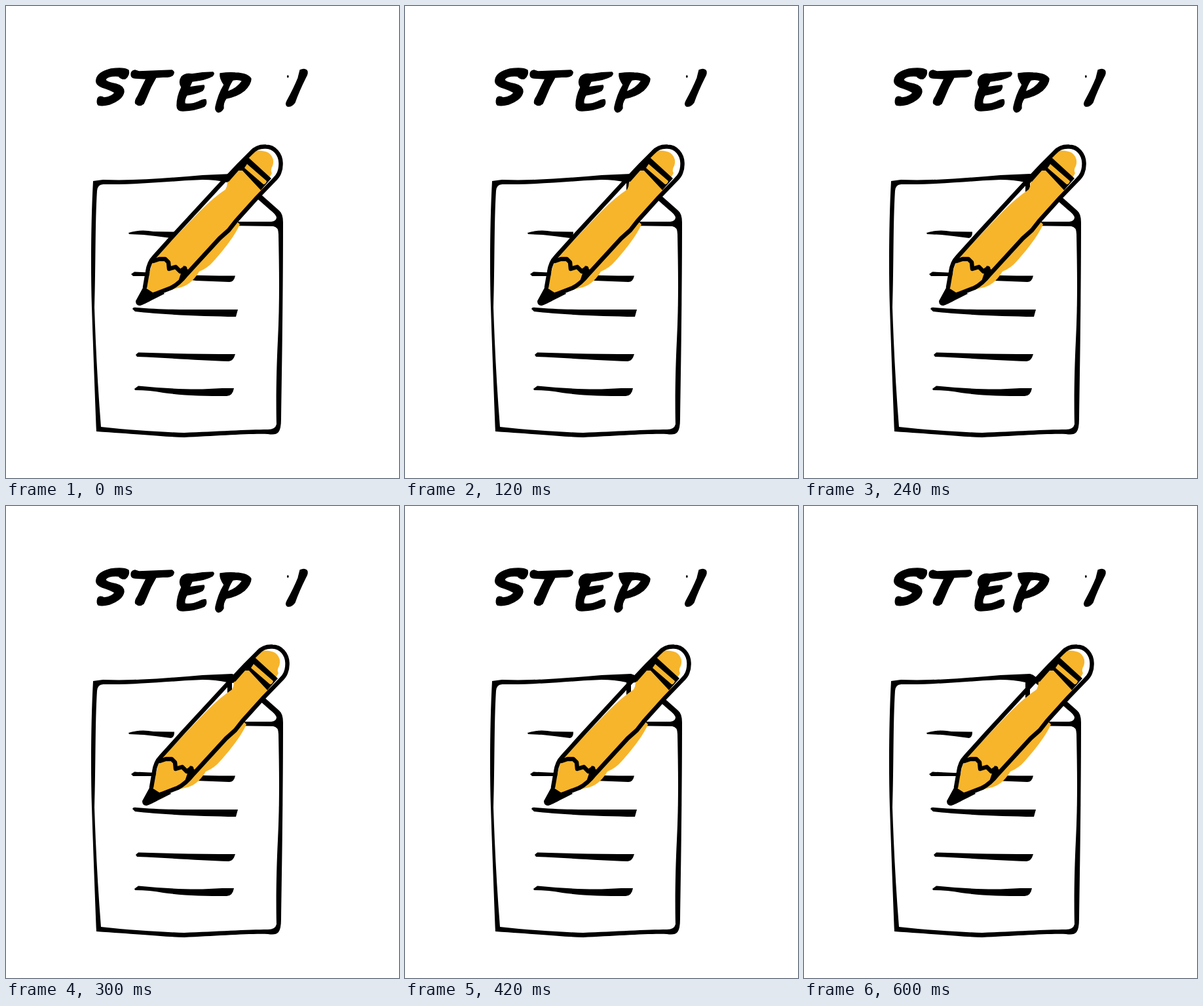
An HTML page that plays this animation: 600 px wide and 720 px high, repeating every 0.63 s.

```html
<!DOCTYPE html>
<html lang="en">
<head>
<meta charset="utf-8">
<title>Step 1</title>
<style>
  html, body { margin: 0; width: 100%; height: 100%; overflow: hidden; background: #fff; }
  svg { display: block; width: 600px; height: 720px; }
  .yellow { fill: #f7b52c; }
  .ink { fill: none; stroke: #000; stroke-width: 6.5; stroke-linejoin: round; stroke-linecap: round; }
</style>
</head>
<body>
<svg viewBox="0 0 600 720">
  <g id="lettering" role="img" aria-label="STEP 1" fill-rule="evenodd" stroke="#000" stroke-width="1.4">
    <path d="M187 98Q189 106 182 111Q176 112 172 107Q155 106 152 112Q152 116 168 119Q180 122 180 131Q178 143 158 150Q147 153 141 151Q138 148 140 141Q143 136 150 140Q163 138 166 132Q160 128 147 124Q136 120 138 112Q140 101 160 96Q180 93 187 98Z"/>
    <path d="M191 104Q191 99 197 98L203 100L253 98Q259 100 254 106Q250 109 243 108L229 109Q220 124 214 140L210 149Q204 154 198 149Q196 145 201 138Q207 125 214 111L197 110Q191 110 191 104Z"/>
    <path d="M268 108Q274 102 284 104Q300 101 316 101Q319 103 315 107Q305 113 284 115L280 124Q292 122 302 121Q304 124 300 129Q290 134 276 136Q272 142 273 149Q283 151 294 146Q302 142 305 143Q307 149 303 153Q290 159 270 160Q261 160 261 152Q261 138 268 124Q263 116 268 108Z"/>
    <path d="M327 103Q340 101 350 102Q370 103 374 111Q374 119 364 129Q353 138 336 141Q331 148 332 156Q329 162 324 162Q319 160 320 154Q324 135 333 120Q326 110 327 103ZM346 113Q340 122 338 131Q353 126 361 114Q354 111 346 113Z"/>
    <path d="M449 98Q455 95 459 98Q462 102 457 110Q447 130 441 147Q436 154 430 153Q426 151 429 145Q440 125 446 110Z"/>
    <ellipse cx="430.3" cy="107.5" rx=".7" ry="1.2"/>
  </g>

  <g id="paper" fill-rule="evenodd">
    <path d="M133 267L148 265C200 267 250 262 300 258L345 256Q350 257 354 261L362 267L391 289L417 312Q423 317 423 330C423 450 421 560 420 630Q420 645 416 650Q412 655 400 653C370 652 320 656 272 658C240 657 200 653 138 649C136 600 133 520 131 460C129 400 130 320 133 267Z
      M139 282Q140 271 150 272C200 273 265 266 300 265Q320 265 338 269L338 335L408 336Q416 337 416 348C417 400 418 450 415 510C413 550 412 600 413 638Q411 646 400 646C370 646 320 649 272 651C240 650 190 647 145 642C140 580 137 520 135 460C137 400 136 330 139 282Z
      M345 270L345 329L405 329Q413 328 413 322Q411 317 403 311L386 296L352 269Z"/>
    <path d="M187 346Q205 340 225 344L257 344.500Q257 353 252 354Q230 351 210 349L188 348Z"/>
    <path d="M191 409L196 405.500L240 407.500C280 411 310 411.500 350 411.500Q348 421 341 421L290 419L240 412L194 412Z"/>
    <path d="M193 462Q194 459 199 460C240 464 300 463 354 463L351 474C300 473 240 471 197 466Z"/>
    <path d="M198 532L202 528.500C250 530 300 531 350 531Q347 542 340 542C300 541 250 537 200 535Z"/>
    <path d="M196 584L202 579.500C240 583 270 585 300 584.500L330 583L348 583Q346 595 337 595C300 595 270 594 240 590Q220 586 197 586Z"/>
  </g>

  <g id="pencil">
    <path class="yellow" d="M352 244Q362 229 378 221Q392 219 401 224Q411 232 407 244Q403 250 406 255L402 262L383 293L352 328L357 333C350 350 330 375 318 388Q308 400 295 405Q282 427 263 430L240 436Q232 447 222 447L214 428L224 388L296 313Q318 291 335 280Q338 275 338 269Z"/>
    <path d="M355 243L370 231L405 263L389 281L361 251L355 251L340 268L333 266Z"/>
    <path class="yellow" d="M368 241L398 267Q397 272 393 272L364 247Z"/>
    <path class="ink" stroke-width="8" d="M225 389L234 386L243 386L248 391L249 401L259 398L266 405L273 400"/>
    <path d="M271 396L280 404L271 419L264 417L268 405Z"/>
    <path d="M210 428L224 437L238 435L242 439L222 449Q207 457 204 457Q198 457 198 450Z"/>
    <path class="ink" d="M212 429L216 406Q218 391 226 383L258 347.500L330 269.500L356 242L375 223C382 215 390 214 397 214.500C410 215 419 226 419.500 239C420 250 416 259 410 264.500L383 292.500L351 328L340 342L326 354.500L298 385L276 409Q264 424 252 430L226 440"/>
  </g>
</svg>
<script>
  const LOOP = 630, STEP = 30;
  const pencil = document.getElementById("pencil");

  // The pencil slides right one pixel per step, then snaps back.
  function draw(now) {
    const shift = Math.floor((now % LOOP) / STEP);
    pencil.setAttribute("transform", `translate(${shift} 0)`);
    requestAnimationFrame(draw);
  }
  requestAnimationFrame(draw);
</script>
</body>
</html>
```
